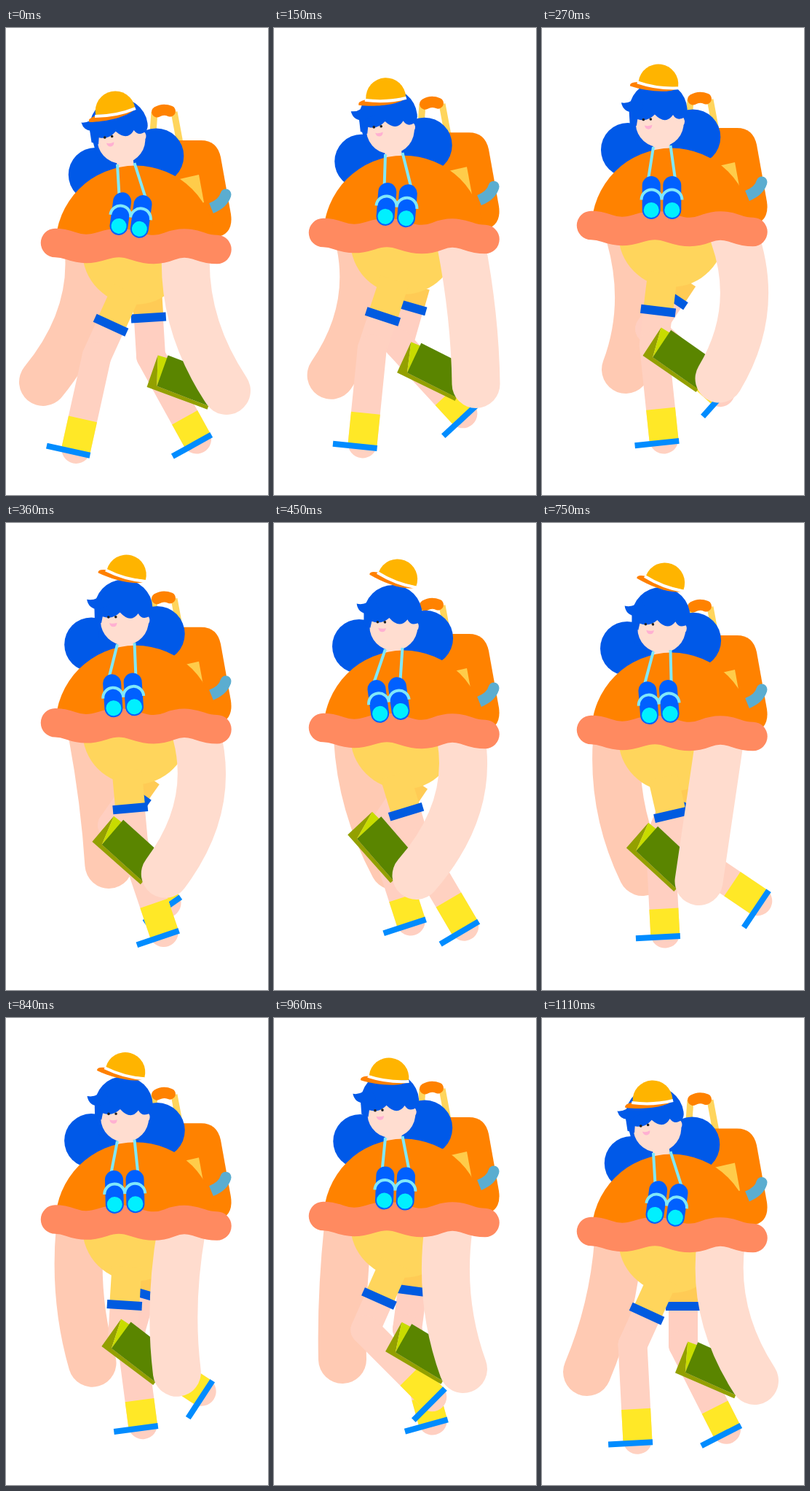
An HTML page for the animation above (1140 ms loop, 360 by 640 pixels).

```html
<!DOCTYPE html>
<html lang="en">
<head>
<meta charset="utf-8">
<title>Hiker walk cycle</title>
<style>
  html, body { margin: 0; width: 100%; height: 100%; overflow: hidden; background: #fff; }
  svg { display: block; width: 100%; height: 100%; }
</style>
</head>
<body>
<svg id="stage" viewBox="0 0 360 640"></svg>
<script>
const LOOP = 1140, STEP = 30;
const KEYS = [0, 270, 450, 570, 750, 960, 1110];

// Smooth curve through the keys: at rest at the start, straight run-out at the end.
function track(values, times = KEYS) {
  const last = times.length - 1;
  const slope = i => (values[i + 1] - values[i]) / (times[i + 1] - times[i]);
  const tangent = i => {
    if (i === 0) return 0;
    if (i === last) return slope(last - 1);
    const before = times[i] - times[i - 1], after = times[i + 1] - times[i];
    return (slope(i - 1) * after + slope(i) * before) / (before + after);
  };
  const tangents = times.map((_, i) => tangent(i));
  return t => {
    let i = 0;
    while (i < last - 1 && t >= times[i + 1]) i++;
    const h = times[i + 1] - times[i], u = (t - times[i]) / h, v = 1 - u;
    return values[i] * v * v * (1 + 2 * u) + values[i + 1] * u * u * (3 - 2 * u)
      + h * u * v * (tangents[i] * v - tangents[i + 1] * u);
  };
}

const motion = {
  body: track([24, 0, 10, 20, 13, 1, 22]),
  pack: track([17, 0, 15, 29, 17, -1, 14.5]),
  headTilt: track([-8.5, -3.5, 0.5, 3.5, 0.5, -4, -8.5]),
  headLift: track([-4, -2, 0, 1, 0, -2, -4]),
  swing: track([7, 0, -7, -11, -4, 2, 7]),
  frontThigh: track([-24.5, -7, 17, 26, 13, -24, -24.5]),
  frontShin: track([-12.5, 6, 30.5, 37, 56, 45, 3]),
  backThigh: track([3.5, -33.5, -34, -32, -22.4, -7.6, 0]),
  backShin: track([29, 48, 18, 0, 3, 15.5, 27]),
  bookTurn: track([21, 35, 49, 56, 43, 31, 24])
};

const HAT_TIMES = [0, 270, 350, 450, 570, 750, 860, 960, 1110];
const hat = {
  x: track([150, 160, 165, 170, 177, 169, 163, 158, 152], HAT_TIMES),
  y: track([113, 76, 70, 76, 82, 81, 73, 81, 112], HAT_TIMES),
  tilt: track([-11, 8, 15, 21, 27, 21, 14, 7, -3], HAT_TIMES)
};

const nearArm = {
  top: track([247, 264, 257, 252, 244, 240, 246]),
  bend: track([243, 300, 274, 273, 229, 226, 233]),
  handX: track([303, 243.5, 195.5, 173.5, 215.5, 260, 292]),
  handY: track([497, 480.5, 483, 487, 491, 481, 497])
};
const farArm = {
  top: track([114, 121, 115, 111, 103, 102, 105]),
  bend: track([120, 148, 120, 105, 96.5, 92, 98]),
  handX: track([51, 115, 165, 183, 138, 94, 62]),
  handY: track([485, 468, 470, 475, 478, 468, 485])
};

const HAIR = '#0059e8', ORANGE = '#ff8200', SHORTS = '#ffd55c', FACE = '#ffddd0';
const group = (id, content) => `<g id="${id}">${content}</g>`;
const line = (d, color, width, cap = 'butt') =>
  `<path d="${d}" fill="none" stroke="${color}" stroke-width="${width}" stroke-linecap="${cap}"/>`;
const shape = (d, color) => `<path d="${d}" fill="${color}"/>`;
const circle = (x, y, r, color, id = '') =>
  `<circle ${id && `id="${id}"`} cx="${x}" cy="${y}" r="${r}" fill="${color}"/>`;
const box = (x, y, w, h, color) =>
  `<rect x="${x}" y="${y}" width="${w}" height="${h}" fill="${color}"/>`;

const leg = (name, skin, cloth, thigh, cuff, sock) => group(name + 'Thigh',
  line(`M0 ${cuff}V${thigh}`, skin, 40, 'round') +
  group(name + 'Shin',
    line('M0 0V130', skin, 40, 'round') +
    box(-20, 131 - sock, 40, sock, '#ffe827') +
    box(-40.5, 130.5, 61, 8, '#008cff')) +
  line(`M0 0V${cuff}`, cloth, 41) +
  box(-24, cuff - 6, 48, 12, '#005be0'));

const tube = x =>
  line(`M${x} -17V17`, '#0060ff', 25, 'round') + circle(x, 17, 10.5, '#00f0ff');

const backpack = group('pack',
  line('M204 98L202 126', SHORTS, 9) +
  line('M231 98L243 162', SHORTS, 9) +
  line('M207.5 98Q216 93 225.500 97', ORANGE, 15, 'round') +
  shape('M230 137H268Q290 137 295 160L309 238Q313 266 288 270H230Z', ORANGE) +
  shape('M230 192L265 184L272 222L240 230Z', '#ffcc4a') +
  line('M282 230Q299 223 302 211', '#5badd0', 15) +
  circle(302, 211, 7.5, '#5badd0'));

const head = group('head',
  shape('M123 112H195V138H150V155H128Z', HAIR) +
  box(153, 145, 23, 40, FACE) +
  circle(164, 132, 33, FACE) +
  circle(190.5, 131.500, 8, FACE) +
  shape('M123 115A40 40 0 0 1 203 115Q203 122 199 126Q188 132 183 122'
    + 'Q172 136 158 120Q147 130 134 125L132 134L123 130Z', HAIR) +
  shape('M136 92Q126 104 113 101Q115 114 128 115L145 110Z', HAIR) +
  circle(142, 126, 1.8, '#222') +
  circle(152, 126, 1.8, '#222') +
  shape('M143 134Q148 136 153.500 134Q153 139.500 148.500 139.500Q144 139.500 143 134Z', '#ffb0d2'));

const cap = group('hat',
  shape('M27 3C16 12-16 13-38 9Q-40 4-28 2Z', '#ff8000') +
  shape('M-27.500 1A27.500 27.500 0 0 1 27.500 1Q0 6-27.500 1Z', '#ffb400') +
  line('M-29 2.500Q0 8 28 2.500', '#fff', 4));

const book = group('book',
  shape('M-14-40L-12.500 6L76 5V0H0Z', '#93a000') +
  shape('M-14-40L0-41V0Z', '#c8dc00') +
  shape('M0 0L-1-45H70L76 0Z', '#5a8500'));

const binoculars = group('binoculars',
  tube(-14.3) + tube(14.3) +
  line('M-28 3A14 14 0 0 1 0 3A14 14 0 0 1 28 3', '#80e8fa', 4));

const arm = (id, color) =>
  `<path id="${id}" fill="none" stroke="${color}" stroke-width="66" stroke-linecap="round"/>`;

const stage = document.getElementById('stage');
stage.innerHTML =
  backpack +
  arm('farArm', '#ffcab3') +
  leg('back', '#ffcfc1', '#ffcb55', 83, 30, 35) +
  group('hips', circle(178, 282, 73, SHORTS)) +
  leg('front', '#ffd1c1', SHORTS, 100, 53, 43) +
  book +
  arm('nearArm', '#ffdcce') +
  group('torso',
    circle(0, 0, 37, HAIR, 'leftBun') +
    circle(0, 0, 38, HAIR, 'rightBun') +
    head +
    shape('M68 274.500A110 110 0 0 1 288 274.500Z', ORANGE) +
    line('M67.500 270.500C88 270.500 90 278.500 110 278.500S135 270.500 155 270.500'
      + 'S182 279.500 203 279.500S225 271 245 271S268 279.500 290 279.500', '#ff8a60', 39.5, 'round') +
    '<path id="straps" fill="none" stroke="#80e8fa" stroke-width="4"/>' +
    binoculars) +
  cap;

const parts = {};
stage.querySelectorAll('[id]').forEach(el => parts[el.id] = el);

const set = (id, name, value) => parts[id].setAttribute(name, value);
const place = (id, x, y, turn = 0) =>
  set(id, 'transform', `translate(${x} ${y}) rotate(${turn})`);

function poseLeg(name, x, y, length, thigh, shin) {
  place(name + 'Thigh', x, y, -thigh);
  place(name + 'Shin', 0, length, thigh - shin);
}

function poseArm(id, a, t, dy) {
  const x = a.handX(t), y = a.handY(t), shoulder = 285 + dy;
  set(id, 'd', `M${a.top(t)} ${shoulder}Q${a.bend(t)} ${(shoulder + y) / 2 + 4} ${x} ${y}`);
  return [x, y];
}

function poseBinoculars(swing) {
  const x = 164.5 + swing, y = 232.5, turn = swing * 1.12;
  const c = Math.cos(turn * Math.PI / 180), s = Math.sin(turn * Math.PI / 180);
  const end = px => `${x + px * c + 22 * s} ${y + px * s - 22 * c}`;
  place('binoculars', x, y, turn);
  set('straps', 'd', `M153 163L${end(-19)}M176.500 161L${end(19)}`);
}

function draw(t) {
  const m = {};
  for (const key in motion) m[key] = motion[key](t);

  place('pack', 0, m.pack);
  place('hips', 0, m.body);
  place('torso', 0, m.body);
  poseLeg('front', 166, 335 + m.body, 100, m.frontThigh, m.frontShin);
  poseLeg('back', 194, 343 + m.body, 83, m.backThigh, m.backShin);

  poseArm('farArm', farArm, t, m.body);
  const [hx, hy] = poseArm('nearArm', nearArm, t, m.body);
  set('book', 'transform', `translate(${hx} ${hy}) rotate(${m.bookTurn}) translate(-91.5 28.5)`);

  const tilt = m.headTilt;
  set('head', 'transform', `translate(0 ${m.headLift}) rotate(${tilt} 166 170)`);
  set('leftBun', 'cx', 117 + 0.08 * tilt * tilt);
  set('leftBun', 'cy', 160 - 2 * tilt);
  set('rightBun', 'cx', 208 + 0.2 * tilt);
  set('rightBun', 'cy', 148 - 0.4 * tilt);
  place('hat', hat.x(t), hat.y(t), hat.tilt(t));
  poseBinoculars(m.swing);
}

const start = performance.now();
function tick() {
  const t = (performance.now() - start) % LOOP;
  draw(Math.floor(t / STEP) * STEP);
  requestAnimationFrame(tick);
}
tick();
</script>
</body>
</html>
```
